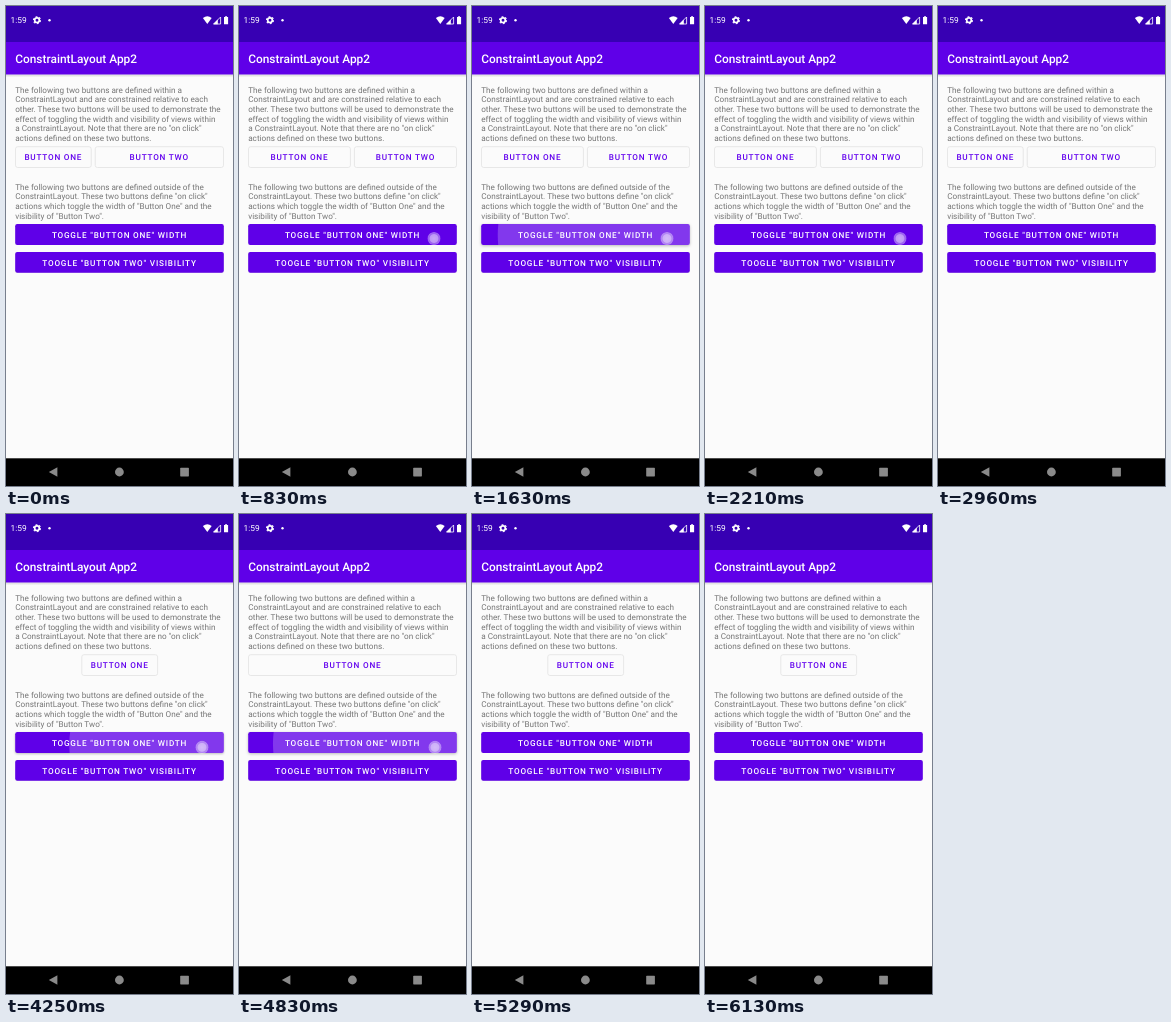
An HTML page that plays this animation: 227x480 px, repeating every 6330 ms.

```html
<!DOCTYPE html>
<html lang="en">
<head>
<meta charset="utf-8">
<title>Constraint layout demo</title>
<style>
  html, body { margin: 0; width: 100%; height: 100%; overflow: hidden; background: #fbfbfb; }
  svg { display: block; width: 227px; height: 480px; }
  text { font-family: Roboto, "Liberation Sans", sans-serif; white-space: pre; text-rendering: geometricPrecision; }
  .body { font-size: 8.17px; fill: #757575; }
  .label { font-size: 8.2px; font-weight: 500; letter-spacing: .096em; text-anchor: middle; }
  .outlined rect { fill: #fbfbfb; stroke: #e0e0e0; stroke-width: .7; }
  .outlined text { fill: #6200ee; }
  .filled rect { fill: #5f00e8; }
  .filled text { fill: #fff; }
  .ripple { fill: #fff; }
  .icon { fill: #fff; }
  .nav { fill: #8a8a8a; }
</style>
</head>
<body>
<svg viewBox="0 0 227 480">
  <defs>
    <linearGradient id="shade" x2="0" y2="1">
      <stop offset="0" stop-color="#000" stop-opacity=".14"/>
      <stop offset="1" stop-color="#000" stop-opacity="0"/>
    </linearGradient>
    <radialGradient id="spot">
      <stop offset="0" stop-color="#fff" stop-opacity=".66"/>
      <stop offset=".6" stop-color="#fff" stop-opacity=".6"/>
      <stop offset=".74" stop-color="#fff" stop-opacity=".38"/>
      <stop offset=".92" stop-color="#fff" stop-opacity=".4"/>
      <stop offset="1" stop-color="#fff" stop-opacity=".2"/>
    </radialGradient>
  </defs>

  <rect width="227" height="480" fill="#fbfbfb"/>
  <rect y="68.5" width="227" height="3" fill="url(#shade)"/>
  <rect width="227" height="68.5" fill="#5f00e8"/>
  <rect width="227" height="36" fill="#3700b3"/>
  <text x="9.2" y="56.5" font-size="11.9" font-weight="500" fill="#fff">ConstraintLayout App2</text>

  <g class="icon">
    <text x="4.5" y="17.2" font-size="8.4">1:59</text>
    <g fill="none" stroke="#fff">
      <circle cx="31" cy="14.2" r="2.3" stroke-width="1.7"/>
      <circle cx="31" cy="14.2" r="3.5" stroke-width="1.1" stroke-dasharray="1.83"/>
    </g>
    <circle cx="43.5" cy="14.2" r="1.2"/>
    <path d="M196.9 12Q201.3 8.6 205.7 12L201.3 18Z"/>
    <path d="M214.6 11V18H207.6Z" fill="none" stroke="#fff" stroke-width=".8"/>
    <path d="M211.8 13.6V18.2H207.2Z"/>
    <path d="M218 11H219.1V10.2H221V11H222.1V18.2H218Z"/>
  </g>

  <g id="copy"></g>
  <g id="buttons"></g>
  <circle id="touch" r="6.6" fill="url(#spot)"/>

  <rect y="452.3" width="227" height="27.7" fill="#000"/>
  <g class="nav">
    <path d="M51.4 461.2V470.8L42.8 466Z"/>
    <circle cx="113.4" cy="466" r="4.4"/>
    <rect x="174.2" y="461.7" width="8.7" height="8.7" rx=".6"/>
  </g>
</svg>
<script>
const LOOP = 6330, LEFT = 9.2, RIGHT = 217.8, HEIGHT = 20.8;
const NS = 'http://www.w3.org/2000/svg';
const byId = id => document.getElementById(id);

function add(parent, tag, attrs, content) {
  const el = document.createElementNS(NS, tag);
  set(el, attrs);
  if (content) el.textContent = content;
  return parent.appendChild(el);
}
function set(el, attrs) {
  for (const key in attrs) el.setAttribute(key, attrs[key]);
}

function paragraph(y, lines) {
  lines.forEach((line, i) =>
    add(byId('copy'), 'text', { class: 'body', x: 9.2, y: y + i * 9.7 }, line));
}
paragraph(86.5, [
  'The following two buttons are defined within a',
  'ConstraintLayout and are constrained relative to each',
  'other. These two buttons will be used to demonstrate the',
  'effect of toggling the width and visibility of views within',
  'a ConstraintLayout. Note that there are no "on click"',
  'actions defined on these two buttons.'
]);
paragraph(183.5, [
  'The following two buttons are defined outside of the',
  'ConstraintLayout. These two buttons define "on click"',
  'actions which toggle the width of "Button One" and the',
  'visibility of "Button Two".'
]);

function button(kind, y, label) {
  const group = add(byId('buttons'), 'g', { class: kind });
  const box = add(group, 'rect', { y, height: HEIGHT, rx: 2.2 });
  const ripple = add(group, 'circle', { class: 'ripple', opacity: 0 });
  const text = add(group, 'text', { class: 'label', y: y + 13.6 }, label);
  return { group, box, ripple, text, y };
}
function place(b, left, right) {
  set(b.box, { x: left, width: right - left });
  set(b.text, { x: (left + right) / 2 });
}

const one = button('outlined', 140.7, 'BUTTON ONE');
const two = button('outlined', 140.7, 'BUTTON TWO');
const widthButton = button('filled', 218.1, 'TOGGLE "BUTTON ONE" WIDTH');
const visibilityButton = button('filled', 245.9, 'TOOGLE "BUTTON TWO" VISIBILITY');
const toggles = [widthButton, visibilityButton];
toggles.forEach((b, i) => {
  place(b, LEFT, RIGHT);
  const clip = add(document.querySelector('defs'), 'clipPath', { id: 'clip' + i });
  add(clip, 'rect', { x: LEFT, y: b.y, width: RIGHT - LEFT, height: HEIGHT, rx: 2.2 });
  set(b.ripple, { 'clip-path': `url(#clip${i})` });
});

// down: finger shows; start: ripple begins; click: layout changes
const press = (target, down, start, click, x, y) => ({ target, down, start, click, x, y });
const presses = [
  press(widthButton, 40, 115, 240, 195, 232.5),
  press(widthButton, 770, 850, 970, 195, 232.5),
  press(widthButton, 1420, 1502, 1615, 195, 232.5),
  press(widthButton, 2130, 2235, 2360, 195, 232.5),
  press(visibilityButton, 3170, 3250, 3375, 196, 260),
  press(widthButton, 4165, 4167, 4290, 196, 233.3),
  press(widthButton, 4710, 4716, 4910, 196, 233.3)
];

const clamp = v => Math.min(1, Math.max(0, v));
const mix = (a, b, k) => a + (b - a) * k;

// cubic-bezier(.4, 0, .2, 1)
function ease(x) {
  let lo = 0, hi = 1;
  for (let i = 0; i < 20; i++) {
    const s = (lo + hi) / 2, r = 1 - s;
    if (1.2 * r * r * s + .6 * r * s * s + s * s * s < x) lo = s; else hi = s;
  }
  return 3 * (1 - lo) * lo * lo + lo ** 3;
}

function layout(t) {
  const odd = target =>
    presses.filter(p => p.target === target && t >= p.click).length % 2 === 1;
  const wide = odd(widthButton), hidden = odd(visibilityButton);
  two.group.style.display = hidden ? 'none' : '';
  if (hidden) {
    wide ? place(one, LEFT + .3, RIGHT - .3) : place(one, 75.8, 151.6);
  } else {
    const split = wide ? 111.4 : 85.2;
    place(one, LEFT + .3, split);
    place(two, split + 4, RIGHT - .3);
  }
}

function drawToggle(b, t) {
  const p = presses.find(p => p.target === b && t >= p.start && t < p.start + 480);
  const age = p ? t - p.start : 0;
  const lift = p ? clamp(age / 100) * (1 - clamp((age - 280) / 180)) : 0;
  b.box.style.filter =
    `drop-shadow(0 ${mix(.5, 1.6, lift)}px ${mix(.4, 1.4, lift)}px rgba(0,0,0,${mix(.16, .26, lift)}))`;
  if (!p) return set(b.ripple, { opacity: 0 });
  const k = ease(clamp(age / 225));
  set(b.ripple, {
    cx: mix(p.x, 113.5, k),
    cy: mix(p.y, b.y + HEIGHT / 2, k),
    r: mix(63, 106, k),
    opacity: .22 * clamp(age / 75) * (1 - clamp((age - 240) / 160))
  });
}

function drawTouch(t) {
  const p = presses.find(p => t >= p.down && t < p.start + 300);
  set(byId('touch'), p
    ? { cx: p.x, cy: p.y, opacity: 1 - clamp((t - p.start - 240) / 60) }
    : { opacity: 0 });
}

const begin = performance.now();
function frame() {
  const t = (performance.now() - begin) % LOOP;
  layout(t);
  toggles.forEach(b => drawToggle(b, t));
  drawTouch(t);
  requestAnimationFrame(frame);
}
frame();
</script>
</body>
</html>
```
